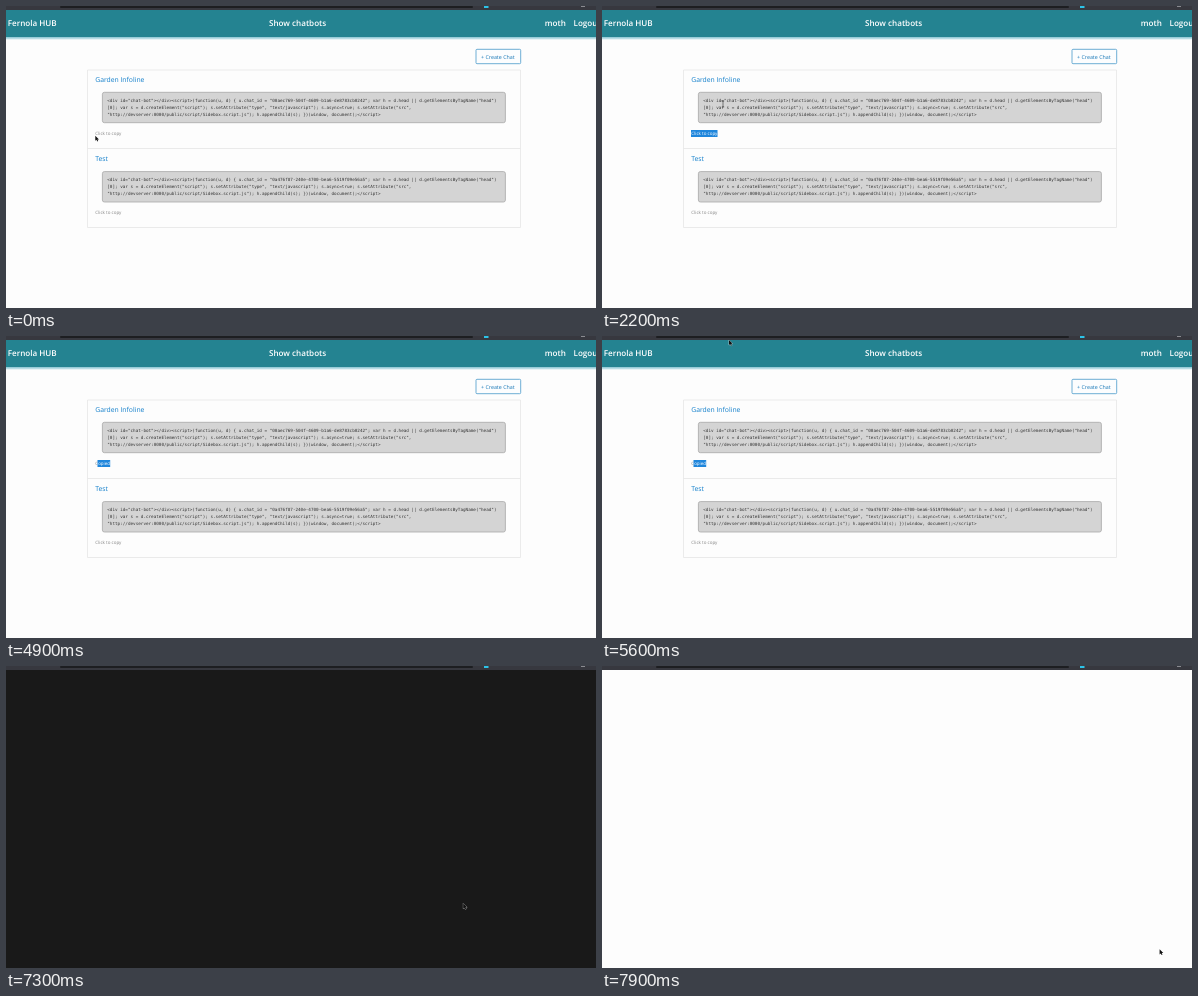
These frames come from a looping animation (590x302 px, 8 s). An HTML page:

```html
<!DOCTYPE html>
<html lang="en">
<head>
<meta charset="utf-8">
<title>Chat list</title>
<style>
  html, body { margin: 0; width: 100%; height: 100%; overflow: hidden; background: #fdfdfd; }
  svg { display: block; width: 590px; height: 302px; }
  text { font-family: "Open Sans", "Noto Sans", sans-serif; text-rendering: geometricPrecision; white-space: pre; }
  .bar { font-size: 8.1px; font-weight: 600; fill: #fff; }
  .link { font-size: 6.8px; fill: #127fcb; }
  .button { font-size: 5.35px; font-weight: 500; fill: #1878b8; }
  .note { font-size: 4.5px; fill: #858585; }
  .picked { fill: #fff; }
  .code { font-family: "DejaVu Sans Mono", "Noto Sans Mono", monospace; font-size: 4.29px; fill: #333; }
</style>
</head>
<body>
<svg viewBox="0 0 590 302">
  <defs>
    <linearGradient id="glow" x2="0" y2="1">
      <stop stop-color="#7fc3d2"/><stop offset="1" stop-color="#fdfdfd"/>
    </linearGradient>
    <clipPath id="pickClip"><rect id="pickArea" y="124" height="7"/></clipPath>
  </defs>
  <rect id="backdrop" width="590" height="302"/>

  <g id="page">
    <rect y="4" width="590" height="27.3" fill="#248391"/>
    <rect y="31.3" width="590" height="2.7" fill="url(#glow)"/>
    <text class="bar" x="1.7" y="20">Fernola HUB</text>
    <text class="bar" x="263" y="20">Show chatbots</text>
    <text class="bar" x="538.8" y="20">moth</text>
    <text class="bar" x="567.5" y="20">Logout</text>

    <rect x="470" y="43.3" width="44.7" height="14.4" rx="1" fill="#fcfdfe" stroke="#4a9acb" stroke-width=".8"/>
    <text class="button" x="475" y="52.6">+ Create Chat</text>

    <path d="M81.5 64H514.5V221.5H81.5ZM81.5 142.5H514.5" fill="none" stroke="#e6e6e6" stroke-width=".8"/>
    <g id="cards"></g>
    <path id="underline" d="M89.5 76.7H139.5" stroke="#127fcb" stroke-width=".7"/>
    <text class="note" id="note" x="89.3" y="129"></text>
    <g clip-path="url(#pickClip)">
      <rect x="89" y="124" width="30" height="7" fill="#1f86dc"/>
      <text class="note picked" id="pickedNote" x="89.3" y="129"></text>
    </g>
  </g>

  <rect width="590" height="4" fill="#37383f"/>
  <rect x="54" width="413" height="2" rx="1" fill="#1d1e21"/>
  <rect x="478" width="4.5" height="2" fill="#2cc3e8"/>
  <rect x="575" width="4" height="1" fill="#8a8b90"/>

  <g id="cursor">
    <path id="arrow" d="M0 0V5.1L1.2 4.1L2 5.8L2.9 5.4L2.1 3.7H3.7Z" fill="#111" stroke="#fff" stroke-width=".5" paint-order="stroke"/>
    <path id="beam" d="M-1.2-3H1.2M0-3V3M-1.2 3H1.2" fill="none" stroke="#333" stroke-width=".6"/>
    <path id="hand" d="M1.3.4Q2-.2 2.4.6V2.6L4.7 3.1Q5.3 3.4 5.1 4.4L4.5 6.5H1.9L.1 4.2Q0 3.4 1.3 4Z" fill="#fff" stroke="#222" stroke-width=".6"/>
  </g>
</svg>
<script>
const LOOP = 8000, STEP = 100;
const $ = id => document.getElementById(id);

const card = (title, id, top) => {
  const lines = [
    `<div id="chat-bot"></div><script>(function(u, d) { u.chat_id = "${id}"; var h = d.head || d.getElementsByTagName("head")`,
    `[0]; var s = d.createElement("script"); s.setAttribute("type", "text/javascript"); s.async=true; s.setAttribute("src",`,
    `"http://devserver:0000/public/script/Sidebox.script.js"); h.appendChild(s); })(window, document);<\/script>`
  ];
  const safe = s => s.replace(/</g, "&lt;");
  return `<g transform="translate(0 ${top})">
    <text class="link" x="89.2" y="11.6">${title}</text>
    <rect x="96.4" y="22.3" width="403" height="30.4" rx="2" fill="#d4d4d4" stroke="#a9a9a9" stroke-width=".8"/>
    ${lines.map((s, i) => `<text class="code" x="101.3" y="${31.6 + i * 6.95}">${safe(s)}</text>`).join("")}
  </g>`;
};
$("cards").innerHTML =
  card("Garden Infoline", "00aec769-504f-4609-b1a6-de8783cb0242", 64) +
  card("Test", "0a476f87-240e-4700-bea6-5519f09e56a5", 143.3) +
  `<text class="note" x="89.3" y="208.3">Click to copy</text>`;

// time, x, y, pointer shape from that time on
const path = [
  [0, 89.3, 129.7, "arrow"], [500, 89.3, 129.7, "arrow"], [600, 90.5, 127, "beam"],
  [1300, 90.5, 127, "beam"], [1700, 116, 127, "beam"], [2000, 121, 98, "beam"],
  [2200, 121, 98, "beam"], [2300, 128, 114, "arrow"], [2400, 110, 128, "beam"],
  [3000, 110, 128, "beam"], [3300, 188, 77.3, "hand"], [3400, 180, 88, "arrow"],
  [3900, 106, 128, "beam"], [4200, 91.5, 128, "beam"], [4500, 104, 128, "beam"],
  [4700, 110, 128, "arrow"], [4900, 110, 128, ""], [5500, 118, 70, "arrow"],
  [5600, 127, 4, "arrow"], [5800, 124, 0, "arrow"], [6000, 49, -2, "arrow"],
  [6500, 34, -4, "arrow"], [6700, 30, -5, "arrow"], [6900, 60, 15, "arrow"],
  [7200, 434.5, 241.8, "arrow"], [7300, 457.3, 237.6, "arrow"],
  [7700, 551, 265, "arrow"], [7800, 560, 275, "arrow"], [7900, 557.6, 283.3, "arrow"]
];

const within = (t, from, to) => t >= from && t < to;
const show = (id, on) => $(id).setAttribute("visibility", on ? "visible" : "hidden");
const grow = (t, from, to) => Math.min(1, Math.max(0, (t - from) / (to - from)));

function pointerAt(t) {
  const i = path.findLastIndex(p => p[0] <= t);
  const a = path[i], b = path[i + 1] || a;
  const k = a === b ? 0 : (t - a[0]) / (b[0] - a[0]);
  return { x: a[1] + (b[1] - a[1]) * k, y: a[2] + (b[2] - a[2]) * k, shape: a[3] };
}

function draw(t) {
  const dark = within(t, 7300, 7400);
  $("backdrop").setAttribute("fill", dark ? "#191919" : "#fdfdfd");
  $("page").style.display = t < 6900 ? "" : "none";
  $("underline").style.display = within(t, 3200, 3500) ? "" : "none";

  const label = within(t, 2600, 6900) ? "Copied" : "Click to copy";
  $("note").textContent = $("pickedNote").textContent = label;

  const first = within(t, 1400, 2300);
  const width = first ? 26.5 * grow(t, 1300, 1700) : 12.7 * grow(t, 4200, 4500);
  $("pickArea").setAttribute("x", first ? 89 : 91.5);
  $("pickArea").setAttribute("width", width);

  const { x, y, shape } = pointerAt(t);
  $("cursor").setAttribute("transform", `translate(${x} ${y})`);
  for (const id of ["arrow", "beam", "hand"]) show(id, id === shape);
}

function tick() {
  const t = performance.now() % LOOP;
  draw(Math.floor(t / STEP) * STEP);
  requestAnimationFrame(tick);
}
tick();
</script>
</body>
</html>
```
